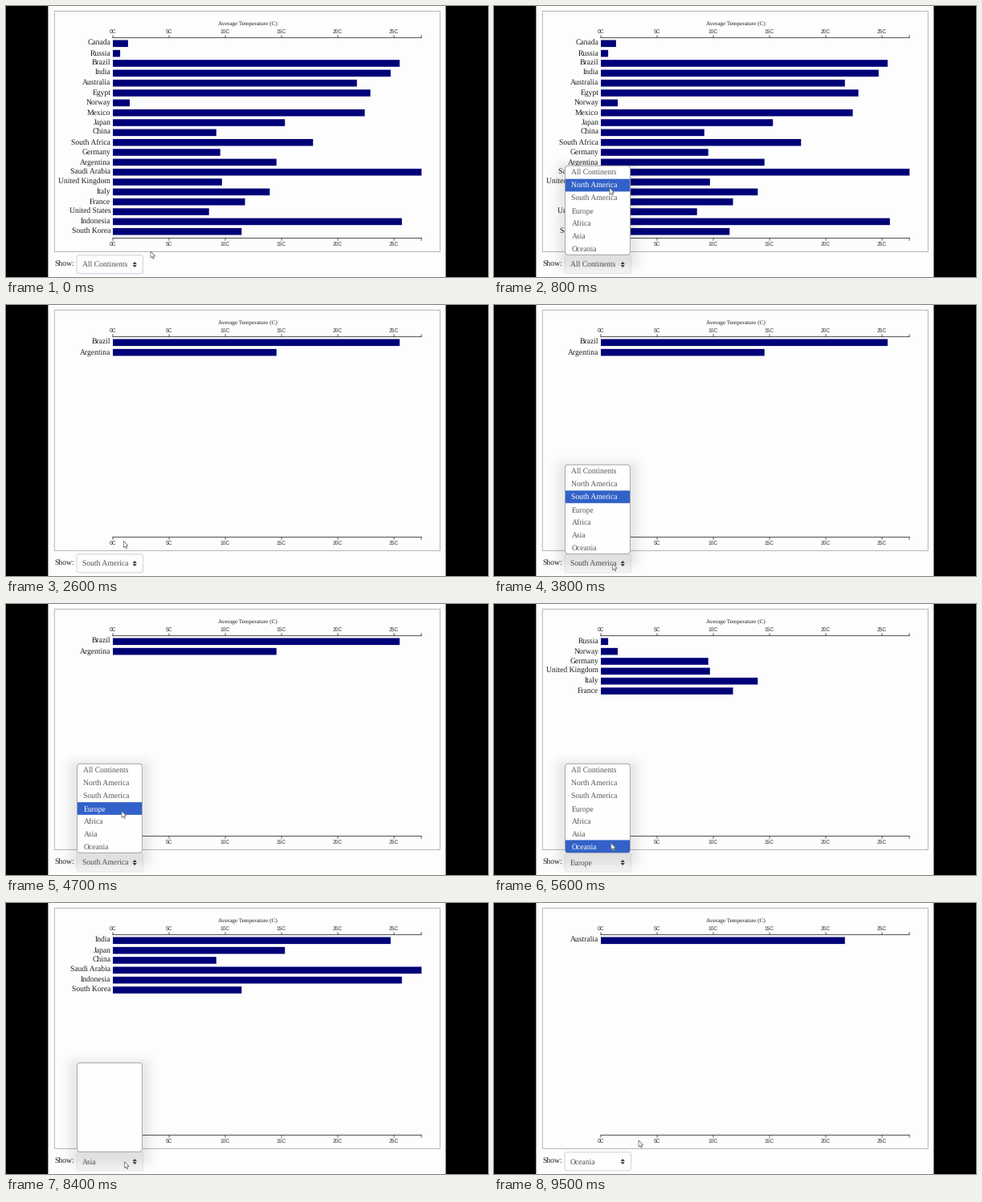
A matplotlib script that plays this animation: 600x338 px, repeating every 9600 ms.

```python
import numpy as np
import matplotlib.pyplot as plt
from matplotlib.animation import FuncAnimation
from matplotlib.patches import FancyBboxPatch, Polygon, Rectangle

W, H, DPI = 600, 338, 100
FRAMES, INTERVAL = 96, 100
PX = 72 / DPI  # points per pixel
plt.rcParams["text.hinting"] = "none"

SERIF, SANS = "Liberation Serif", "Liberation Sans"
X0, X_END, PER_DEGREE = 133, 517, 14
ROW_TOP, ROW_STEP, BAR_H = 42.5, 12.34, 8.6
NAVY, INK, AXIS = "#000078", "#1c1c1c", "#333333"

ALL = "All Continents"
OPTIONS = [ALL, "North America", "South America", "Europe", "Africa", "Asia", "Oceania"]
NA, SA, EU, AF, AS, OC = OPTIONS[1:]
TEMPS = [
    ("Canada", 1.35, NA), ("Russia", 0.65, EU), ("Brazil", 25.5, SA),
    ("India", 24.7, AS), ("Australia", 21.7, OC), ("Egypt", 22.9, AF),
    ("Norway", 1.5, EU), ("Mexico", 22.4, NA), ("Japan", 15.3, AS),
    ("China", 9.2, AS), ("South Africa", 17.8, AF), ("Germany", 9.55, EU),
    ("Argentina", 14.55, SA), ("Saudi Arabia", 27.45, AS),
    ("United Kingdom", 9.7, EU), ("Italy", 13.95, EU), ("France", 11.75, EU),
    ("United States", 8.55, NA), ("Indonesia", 25.7, AS), ("South Korea", 11.45, AS),
]

# dropdown geometry
MENU_X, MENU_Y, MENU_W, MENU_H = 88.5, 199.3, 81, 111
ITEM_Y, ITEM_STEP = 208, 15.75

# menu opens, option is picked (frames), option
VISITS = [(4, 10, NA), (16, 20, SA), (37, 48, EU), (53, 60, AF), (72, 78, AS), (84, 90, OC)]
START, BUTTON, END = (180, 306), (147.5, 322.5), (180, 296)
TRAVEL = 5  # longest pointer move, in frames
ARROW = np.array([(0, 0), (0, 8.2), (1.9, 6.5), (3.1, 9.2), (4.4, 8.6), (3.2, 6), (5.7, 6)])

fig = plt.figure(figsize=(W / DPI, H / DPI), dpi=DPI, facecolor="black")
ax = fig.add_axes([0, 0, 1, 1])
ax.axis("off")


def text(x, y, s, size=9.65, font=SERIF, color=INK, ha="left", z=3):
    return ax.text(x, y, s, fontsize=size * PX, family=font, color=color,
                   ha=ha, va="baseline", zorder=z)


def rect(x, y, w, h, color, z=1):
    return ax.add_patch(Rectangle((x, y), w, h, fc=color, ec="none", lw=0,
                                  zorder=z, snap=False))


def rounded(x, y, w, h, r, fc, ec, z):
    return ax.add_patch(FancyBboxPatch(
        (x, y), w, h, boxstyle=f"round,pad=0,rounding_size={r}",
        fc=fc, ec=ec, lw=PX, zorder=z))


def draw_axis(line_y, tick_y, label_y):
    rect(X0 - 0.4, line_y, X_END - X0 + 0.8, 0.85, AXIS, 2)
    for x in [*range(X0, X_END, 5 * PER_DEGREE), X_END]:
        rect(x - 0.4, tick_y, 0.85, 3.6, AXIS, 2)
    for degrees in range(0, 26, 5):
        text(X0 + degrees * PER_DEGREE, label_y, f"{degrees}C", 6.7, SANS, AXIS, "center")


def draw_chart(continent):
    rows = [r for r in TEMPS if continent in (ALL, r[2])]
    parts = []
    for i, (name, temp, _) in enumerate(rows):
        y = ROW_TOP + i * ROW_STEP
        parts.append(rect(X0, y, temp * PER_DEGREE, BAR_H, NAVY))
        parts.append(text(130.3, y + 6.8, name, ha="right"))
    return parts


def draw_shadow():
    x0, x1, y0, y1 = 56, 202, 180, H
    x, y = np.meshgrid(np.arange(x0, x1) + 0.5, np.arange(y0, y1) + 0.5)
    dx = np.maximum(abs(x - MENU_X - MENU_W / 2) - MENU_W / 2, 0)
    dy = np.maximum(abs(y - MENU_Y - 6 - MENU_H / 2) - MENU_H / 2, 0)
    rgba = np.zeros(x.shape + (4,))
    rgba[..., 3] = 0.08 * np.exp(-(dx**2 + dy**2) / 150)
    return ax.imshow(rgba, extent=(x0, x1, y1, y0), aspect="auto",
                     interpolation="nearest", zorder=5)


def show(parts, on):
    for part in parts:
        part.set_visible(on)


def pointer_keys():
    """Key points (frame, x, y): button, option, back to the next button."""
    keys = [(0, *START)]
    leave = 0
    for opened, picked, name in VISITS:
        option = (144, ITEM_Y + OPTIONS.index(name) * ITEM_STEP + 3)
        keys.append((min(opened, leave + TRAVEL), *BUTTON))
        keys.append((opened + 1, *BUTTON))
        keys.append((min(picked - 2, opened + 1 + TRAVEL), *option))
        leave = picked + 3
        keys.append((leave, *option))
    return np.array(keys + [(FRAMES - 1, *END)])


# page and chart frame
rect(52.4, 0, 495, H, "#fdfdfd", 0)
ax.add_patch(Rectangle((60.3, 6.4), 480, 300, fc="none", ec="#b4b4b4", lw=PX,
                       zorder=1, snap=False))
text(301, 24.8, "Average Temperature (C)", 7.25, ha="center")
draw_axis(39.2, 36.4, 34.4)
draw_axis(289.1, 289.1, 299)
charts = {name: draw_chart(name) for name in OPTIONS}

# select control
text(60.3, 325, "Show:")
select = rounded(88, 310.8, 82.5, 23, 2.5, "#fdfdfd", "#ced4da", 3)
value = text(95, 325.7, ALL, color="#495057", z=4)
for tip, base in ((319, 322), (326, 323)):
    ax.add_patch(Polygon([(157.6, base), (162.8, base), (160.2, tip)],
                         fc="#343a40", ec="none", zorder=4))

# dropdown menu
shadow = draw_shadow()
menu = rounded(MENU_X, MENU_Y, MENU_W, MENU_H, 4, "#fefefe", "#a8a8a8", 6)
marker = rect(MENU_X + 0.3, 0, MENU_W - 0.6, ITEM_STEP, "#3262c8", 7)
marker.set_clip_path(menu)
items = [text(96.5, ITEM_Y + i * ITEM_STEP + 3.2, s, color="#555555", z=8)
         for i, s in enumerate(OPTIONS)]

pointer = ax.add_patch(Polygon(ARROW, closed=True, fc="white", ec="#707070",
                               lw=0.8 * PX, zorder=10))
keys = pointer_keys()
ax.set_xlim(0, W)
ax.set_ylim(H, 0)


def pointer_at(frame):
    k = min(np.searchsorted(keys[:, 0], frame, side="right") - 1, len(keys) - 2)
    a, b = keys[k], keys[k + 1]
    u = (frame - a[0]) / (b[0] - a[0])
    return a[1:] + (b - a)[1:] * u * u * (3 - 2 * u)


def update(frame):
    current = [ALL, *(name for _, picked, name in VISITS if picked <= frame)][-1]
    pos = pointer_at(frame)
    for name, parts in charts.items():
        show(parts, name == current)
    value.set_text(current)
    pointer.set_xy(ARROW + pos)

    is_open = any(a <= frame < b for a, b, _ in VISITS)
    filled = any(a < frame < b for a, b, _ in VISITS)  # opens empty first
    show([shadow, menu], is_open)
    show([marker, *items], filled)
    select.set_facecolor("#f5f5f5" if is_open else "#fdfdfd")
    select.set_edgecolor("#e6e8ea" if is_open else "#ced4da")

    hot = OPTIONS.index(current)
    if pos[1] <= MENU_Y + MENU_H:
        hot = int(np.clip(round((pos[1] - ITEM_Y) / ITEM_STEP), 0, 6))
    marker.set_y(ITEM_Y + (hot - 0.5) * ITEM_STEP - 0.2)
    for i, item in enumerate(items):
        item.set_color("white" if i == hot else "#555555")
    return []


anim = FuncAnimation(fig, update, frames=FRAMES, interval=INTERVAL,
                     repeat=True, repeat_delay=0, blit=False)
plt.show()
```
